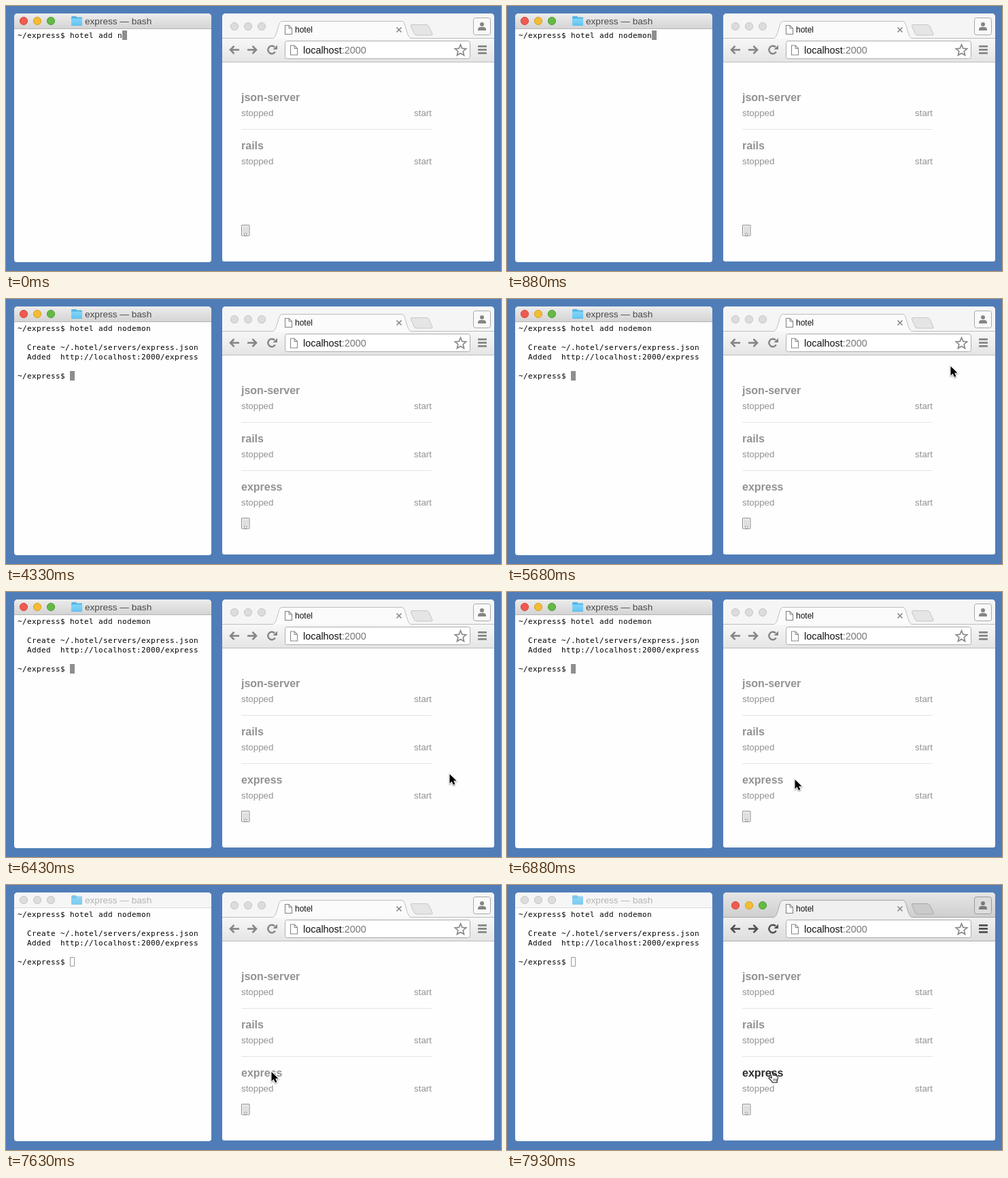
Recreate the animation shown at these times as an HTML page with a canvas. Size 728x390 px, loop 8000 ms.

```html
<!DOCTYPE html>
<html lang="en">
<head>
<meta charset="utf-8">
<title>hotel</title>
<style>
  html, body { margin: 0; width: 100%; height: 100%; overflow: hidden; background: #507db8; }
  canvas { display: block; }
</style>
</head>
<body>
<canvas id="stage" width="728" height="390"></canvas>
<script>
const ctx = document.getElementById('stage').getContext('2d');
const LOOP = 8000;
const SANS = '"Liberation Sans", Arial, sans-serif';
const MONO = '11px "DejaVu Sans Mono", monospace';

const ENTER = 1330, OUTPUT = 1780, ADDED = 4330, BLUR = 7630, FOCUS = 7780, HOVER = 7930;

// [time, letters typed]
const TYPED = [[0, 1], [150, 2], [300, 3], [440, 5], [590, 6], [880, 7]];
// [time, left, top]
const POINTER = [
  [5680, 651, 98], [5830, 669, 174], [5980, 670, 196], [6130, 670, 266], [6430, 651, 267],
  [6580, 495, 279], [6730, 458, 275], [6880, 422, 275], [7030, 389, 274], [7180, 385, 273], [7330, 389, 274]
];
const LIGHTS = [['#ee5b51', '#d8473e'], ['#f2bc35', '#d9a024'], ['#65b944', '#4fa032']];

const latest = (steps, t) => steps.filter(s => s[0] <= t).pop();

function text(str, x, y, font, color, align = 'left') {
  ctx.font = font;
  ctx.fillStyle = color;
  ctx.textAlign = align;
  ctx.fillText(str, x, y);
}

function box(x, y, w, h, r, fill, stroke) {
  ctx.beginPath();
  ctx.roundRect(x, y, w, h, r);
  paint(fill, stroke);
}

function shape(points, fill, stroke, width) {
  ctx.beginPath();
  points.forEach(([x, y]) => ctx.lineTo(x, y));
  ctx.closePath();
  paint(fill, stroke, width);
}

function line(points, color, width = 1) {
  ctx.beginPath();
  points.forEach(([x, y]) => ctx.lineTo(x, y));
  paint(null, color, width);
}

function paint(fill, stroke, width = 1) {
  if (fill) { ctx.fillStyle = fill; ctx.fill(); }
  if (stroke) { ctx.strokeStyle = stroke; ctx.lineWidth = width; ctx.stroke(); }
}

function fade(top, bottom, from, to) {
  const g = ctx.createLinearGradient(0, top, 0, bottom);
  g.addColorStop(0, from);
  g.addColorStop(1, to);
  return g;
}

function at(x, y, draw) {
  ctx.save();
  ctx.translate(x, y);
  draw();
  ctx.restore();
}

function lights(x, y, active) {
  LIGHTS.forEach(([fill, edge], i) => {
    ctx.beginPath();
    ctx.arc(x + i * 20, y, 5.6, 0, 7);
    paint(active ? fill : '#dcdcdc', active ? edge : '#c6c6c6');
  });
}

// Terminal

function folder(active) {
  ctx.globalAlpha = active ? 1 : 0.55;
  box(96, 15, 8, 5, 1.5, '#52b4e4');
  box(96, 16.5, 16, 12.5, 1.2, '#52b4e4');
  box(96, 18.5, 16, 10, 1, fade(18, 29, '#82d6fb', '#64c4f2'));
  ctx.globalAlpha = 1;
}

function row(str, n) {
  [...str].forEach((c, i) => text(c, 17 + i * 7, 47 + n * 14, MONO, '#000'));
}

function terminal(t) {
  const active = t < BLUR;
  box(12, 11, 290, 366, [5, 5, 4, 4], '#fefefe');
  box(12, 11, 290, 23, [5, 5, 0, 0], active ? fade(11, 34, '#ececec', '#d3d3d3') : '#f6f6f6');
  line([[12, 33.5], [302, 33.5]], active ? '#b4b4b4' : '#dadada');
  lights(26, 22, active);
  folder(active);
  const job = t >= ENTER && t < OUTPUT ? 'node' : 'bash';
  text('express — ' + job, 116, 27, '13.6px ' + SANS, active ? '#484848' : '#b4b4b4');

  const prompt = '~/express$ ';
  const command = prompt + 'hotel add ' + 'nodemon'.slice(0, latest(TYPED, t)[1]);
  row(command, 0);
  let col = command.length, line0 = 0;
  if (t >= ENTER) { col = 0; line0 = 1; }
  if (t >= OUTPUT) {
    row('  Create ~/.hotel/servers/express.json', 2);
    row('  Added  http://localhost:2000/express', 3);
    row(prompt, 5);
    col = prompt.length;
    line0 = 5;
  }
  const x = 17 + col * 7, y = 36 + line0 * 14;
  if (active) box(x, y, 7, 14, 0, '#8e8e8e');
  else box(x + 0.5, y + 0.5, 6, 13, 0, null, '#999');
}

// Browser

function pageIcon(x, y, w, h, color) {
  const f = w * 0.45;
  shape([[x, y], [x + w - f, y], [x + w, y + f], [x + w, y + h], [x, y + h]], '#fff', color, 1.1);
  line([[x + w - f, y], [x + w - f, y + f], [x + w, y + f]], color);
}

function arrow(x, dir, color) {
  line([[x - 7 * dir, 64.5], [x + 5 * dir, 64.5]], color, 2.6);
  line([[x + 0.5 * dir, 58.8], [x + 6 * dir, 64.5], [x + 0.5 * dir, 70.2]], color, 2.6);
}

function reload(color) {
  ctx.beginPath();
  ctx.arc(391, 64.5, 5.7, 0.55, 5.5);
  paint(null, color, 2.4);
  shape([[399, 57.5], [399, 64], [392.5, 64]], color);
}

function star(x, y) {
  const points = Array.from({ length: 10 }, (_, i) => {
    const a = i * Math.PI / 5 - Math.PI / 2, r = i % 2 ? 3.9 : 8.6;
    return [x + r * Math.cos(a), y + r * Math.sin(a)];
  });
  shape(points, '#fff', '#8a8a8a', 1.7);
}

function tabs(active) {
  const edge = active ? '#a6a6a6' : '#bdbdbd';
  box(318, 11, 400, 37, [5, 5, 0, 0], active ? fade(11, 47, '#e6e6e6', '#cfcfcf') : '#f5f5f5');
  lights(336, 30, active);
  line([[318, 47.5], [718, 47.5]], edge);

  ctx.beginPath();
  ctx.moveTo(391, 48);
  ctx.bezierCurveTo(396, 47, 397, 42, 399, 36);
  ctx.bezierCurveTo(402, 26, 402, 22.5, 407, 22.5);
  ctx.lineTo(581, 22.5);
  ctx.bezierCurveTo(586, 22.5, 586, 26, 589, 36);
  ctx.bezierCurveTo(591, 42, 592, 47, 597, 48);
  paint(active ? '#f0f0f0' : '#fbfbfb', edge);

  ctx.beginPath();
  ctx.moveTo(597, 27.5);
  ctx.lineTo(618, 27.5);
  ctx.quadraticCurveTo(621, 27.5, 622, 30);
  ctx.lineTo(627, 41);
  ctx.quadraticCurveTo(627.5, 43, 625, 43);
  ctx.lineTo(604, 43);
  ctx.quadraticCurveTo(601, 43, 600, 40);
  ctx.lineTo(595.5, 30);
  ctx.quadraticCurveTo(595, 27.5, 597, 27.5);
  paint(active ? '#cbcbcb' : '#e5e5e5', active ? '#a9a9a9' : '#c6c6c6');

  pageIcon(410.5, 28.5, 10, 13, '#858585');
  text('hotel', 425, 39, '12px ' + SANS, '#111');
  line([[574.5, 31.5], [581.5, 38.5]], '#8a8a8a', 1.7);
  line([[581.5, 31.5], [574.5, 38.5]], '#8a8a8a', 1.7);

  box(687.5, 17.5, 25, 25, 3, active ? '#dcdcdc' : '#f9f9f9', active ? '#9b9b9b' : '#a9a9a9');
  const user = active ? '#7a7a7a' : '#858585';
  ctx.beginPath();
  ctx.arc(700, 27, 3, 0, 7);
  paint(user);
  box(694, 31, 12, 5, [4, 4, 0, 0], user);
}

function toolbar(active) {
  const color = active ? '#505050' : '#858585';
  box(318, 48, 400, 34, 0, active ? fade(48, 82, '#f0f0f0', '#dddddd') : fade(48, 82, '#f7f7f7', '#e5e5e5'));
  line([[318, 82.5], [718, 82.5]], active ? '#ababab' : '#bcbcbc');
  arrow(336, -1, color);
  arrow(362, 1, color);
  reload(color);
  box(410.5, 51.5, 272, 26, 3, '#fff', '#adadad');
  pageIcon(418.5, 58, 10, 14, '#858585');
  const font = '14.4px ' + SANS;
  text('localhost', 437, 70, font, '#111');
  text(':2000', 437 + ctx.measureText('localhost').width, 70, font, '#777');
  star(668.5, 65.5);
  for (const y of [58, 63, 68]) box(694, y, 13, 2.7, 0.5, color);
}

function server(name, n, color) {
  const y = n * 71;
  if (n) line([[346, 110.5 + y], [626, 110.5 + y]], '#e4e4e4');
  text(name, 346, 140 + y, 'bold 16px ' + SANS, color);
  text('stopped', 346, 162 + y, '13.33px ' + SANS, '#929292');
  text('start', 626, 162 + y, '13.33px ' + SANS, '#929292', 'right');
}

function building() {
  box(346.5, 322.5, 11.5, 15.5, 0.5, null, '#888');
  ctx.fillStyle = '#999';
  for (let r = 0; r < 5; r++)
    for (let c = 0; c < 4; c++)
      if (r < 4 || c % 3 === 0) ctx.fillRect(348.4 + c * 2.2, 324.6 + r * 2.4, 1.2, 1.3);
  box(350.7, 334.3, 3.2, 3.7, 0, null, '#999');
}

function browser(t) {
  const active = t >= FOCUS;
  box(318, 11, 400, 365, [5, 5, 3, 3], '#fefefe');
  tabs(active);
  toolbar(active);
  server('json-server', 0, '#929292');
  server('rails', 1, '#929292');
  if (t >= ADDED) server('express', 2, t >= HOVER ? '#2c2c2c' : '#929292');
  building();
}

// Pointer

function arrowPointer() {
  const points = [[0, 0], [0, 13.8], [3.2, 10.8], [5.4, 15.8], [7.9, 14.7], [5.7, 9.8], [10, 9.8]];
  ctx.shadowColor = 'rgba(0,0,0,.35)';
  ctx.shadowBlur = 2;
  ctx.shadowOffsetY = 1;
  shape(points, '#fff', '#fff', 2);
  ctx.shadowColor = 'transparent';
  shape(points, '#000');
}

function handPointer() {
  ctx.beginPath();
  ctx.moveTo(5.4, 10.5);
  ctx.lineTo(3.2, 4);
  ctx.quadraticCurveTo(2.7, 1.8, 4.2, 1.5);
  ctx.quadraticCurveTo(5.6, 1.4, 6.1, 3);
  ctx.lineTo(7.4, 7);
  ctx.quadraticCurveTo(8.8, 5.6, 10, 7.2);
  ctx.quadraticCurveTo(11.4, 6.2, 12.3, 8);
  ctx.quadraticCurveTo(13.8, 7.4, 14.2, 9.2);
  ctx.quadraticCurveTo(14.8, 12.5, 13.2, 15);
  ctx.lineTo(13, 17.7);
  ctx.lineTo(6.6, 17.7);
  ctx.quadraticCurveTo(5, 14.5, 1.4, 11.8);
  ctx.quadraticCurveTo(0.4, 10, 2.2, 9.7);
  ctx.quadraticCurveTo(4, 9.8, 5.4, 11.6);
  paint('#fff', '#111', 1.1);
  for (const x of [8, 10, 12]) line([[x, 12], [x, 15.5]], '#333', 0.8);
}

function pointer(t) {
  const spot = latest(POINTER, t);
  if (!spot) return;
  if (t >= HOVER) at(384, 273, handPointer);
  else at(spot[1] + 1.5, spot[2] + 1, arrowPointer);
}

function frame() {
  const t = performance.now() % LOOP;
  ctx.fillStyle = '#507db8';
  ctx.fillRect(0, 0, 728, 390);
  terminal(t);
  browser(t);
  pointer(t);
  requestAnimationFrame(frame);
}
frame();
</script>
</body>
</html>
```
